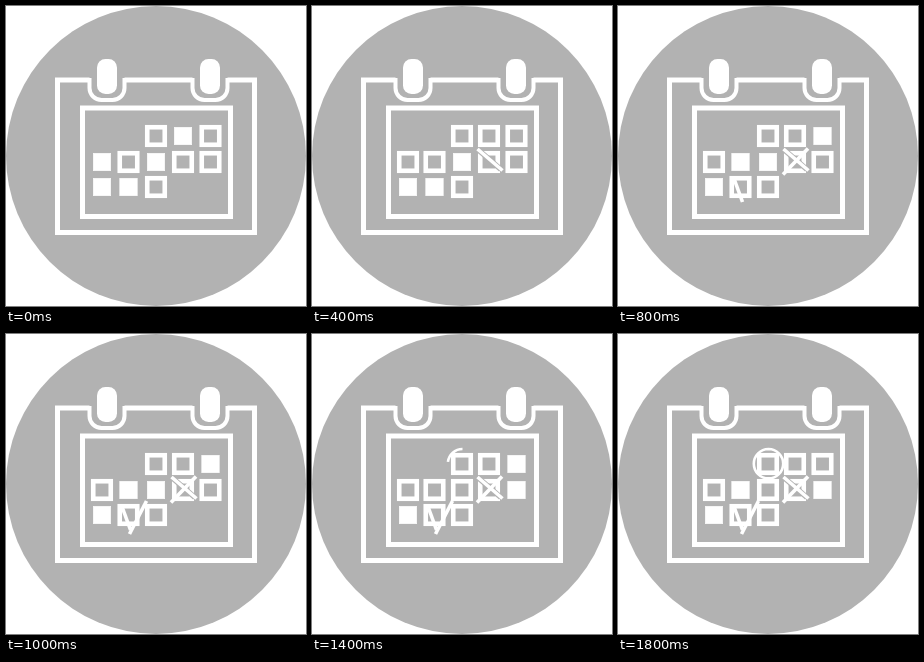
Animation, 300 px wide and 300 px high, one loop 2000 ms. Source, as an HTML page without scripts:

```html
<!DOCTYPE html>
<html lang="en">
<head>
<meta charset="utf-8">
<title>Calendar</title>
<style>
  html, body { margin: 0; width: 100%; height: 100%; overflow: hidden; background: #fff; }
  svg { display: block; width: 100vw; height: 100vh; }

  .line { fill: none; stroke: #fff; }
  .cell { fill: #b2b2b2; stroke: #fff; stroke-width: 4.6px; }
  .full { fill: #fff; stroke-width: .5px; }
  .cell, .mark, .ring { animation: 2s step-end infinite; }

  /* Day cells switch between outlined and filled */
  .early  { animation-name: early; }
  .late   { animation-name: late; }
  .middle { animation-name: middle; }
  .begin  { animation-name: begin; }
  .most   { animation-name: most; }
  .twice  { animation-name: twice; }
  @keyframes early  { 0% { fill: #fff; stroke-width: .5px } 10%, 100% { fill: #b2b2b2; stroke-width: 4.6px } }
  @keyframes begin  { 0% { fill: #fff; stroke-width: .5px } 30%, 100% { fill: #b2b2b2; stroke-width: 4.6px } }
  @keyframes most   { 0% { fill: #fff; stroke-width: .5px } 60%, 100% { fill: #b2b2b2; stroke-width: 4.6px } }
  @keyframes late   { 0% { fill: #b2b2b2; stroke-width: 4.6px } 60%, 100% { fill: #fff; stroke-width: .5px } }
  @keyframes middle { 0%, 90%, 100% { fill: #b2b2b2; stroke-width: 4.6px } 30% { fill: #fff; stroke-width: .5px } }
  @keyframes twice  { 0%, 60% { fill: #b2b2b2; stroke-width: 4.6px } 30%, 90%, 100% { fill: #fff; stroke-width: .5px } }

  /* Pen strokes appear one after another */
  .cross1 { animation-name: cross1; }
  .cross2 { animation-name: cross2; }
  .tick1  { animation-name: tick1; }
  .tick2  { animation-name: tick2; }
  .ring   { animation-name: ring; }
  @keyframes cross1 { 0% { opacity: 0 } 20%, 100% { opacity: 1 } }
  @keyframes cross2 { 0% { opacity: 0 } 30%, 100% { opacity: 1 } }
  @keyframes tick1  { 0% { opacity: 0 } 40%, 100% { opacity: 1 } }
  @keyframes tick2  { 0% { opacity: 0 } 50%, 100% { opacity: 1 } }
  @keyframes ring {
    0% { stroke-dasharray: 0 200 }
    70% { stroke-dasharray: 23 200 }
    80% { stroke-dasharray: 44 200 }
    90%, 100% { stroke-dasharray: 101 200 }
  }
</style>
</head>
<body>
<svg viewBox="0 0 300 300">
  <defs>
    <rect id="day" x="-8.75" y="-8.75" width="17.5" height="17.5"/>
    <g id="binder">
      <path d="M-17.5 68V82a12 12 0 0 0 12 12h11a12 12 0 0 0 12-12V68z" fill="#b2b2b2"/>
      <path class="line" stroke-width="4" d="M-17.5 72V82a12 12 0 0 0 12 12h11a12 12 0 0 0 12-12V72"/>
      <rect x="-10" y="53" width="20" height="35" rx="8.5" fill="#fff"/>
    </g>
  </defs>

  <circle cx="150" cy="150" r="150" fill="#b2b2b2"/>
  <rect class="line" x="51.5" y="74" width="197" height="152.5" stroke-width="5"/>
  <rect class="line" x="76.5" y="102" width="148" height="108.5" stroke-width="5"/>
  <use href="#binder" x="101"/>
  <use href="#binder" x="204"/>

  <use href="#day" class="cell" x="150" y="130"/>
  <use href="#day" class="cell early" x="177" y="130"/>
  <use href="#day" class="cell middle" x="204.5" y="130"/>

  <use href="#day" class="cell early" x="96" y="156"/>
  <use href="#day" class="cell twice" x="122.5" y="156"/>
  <use href="#day" class="cell most" x="150" y="156"/>
  <use href="#day" class="cell" x="177" y="156"/>
  <use href="#day" class="cell late" x="204.5" y="156"/>

  <use href="#day" class="cell full" x="96" y="181"/>
  <use href="#day" class="cell begin" x="122.5" y="181"/>
  <use href="#day" class="cell" x="150" y="181"/>

  <g class="line" stroke-width="3.6">
    <g class="mark cross1">
      <path d="M167 144.5 189 163.5" stroke="#b2b2b2" stroke-width="5.6"/>
      <path d="M165.5 143 190.5 164.5"/>
    </g>
    <path class="mark cross2" d="M190 142.5 165 168.5"/>
    <path class="mark tick1" d="M116.5 174 124.5 196"/>
    <path class="mark tick2" d="M140.5 167 123.5 200"/>
    <path class="ring" pathLength="100" stroke-width="2.6"
          d="M150.5 115a14.7 14.7 0 0 0 0 29.4a14.7 14.7 0 0 0 0-29.4"/>
  </g>
</svg>
</body>
</html>
```
